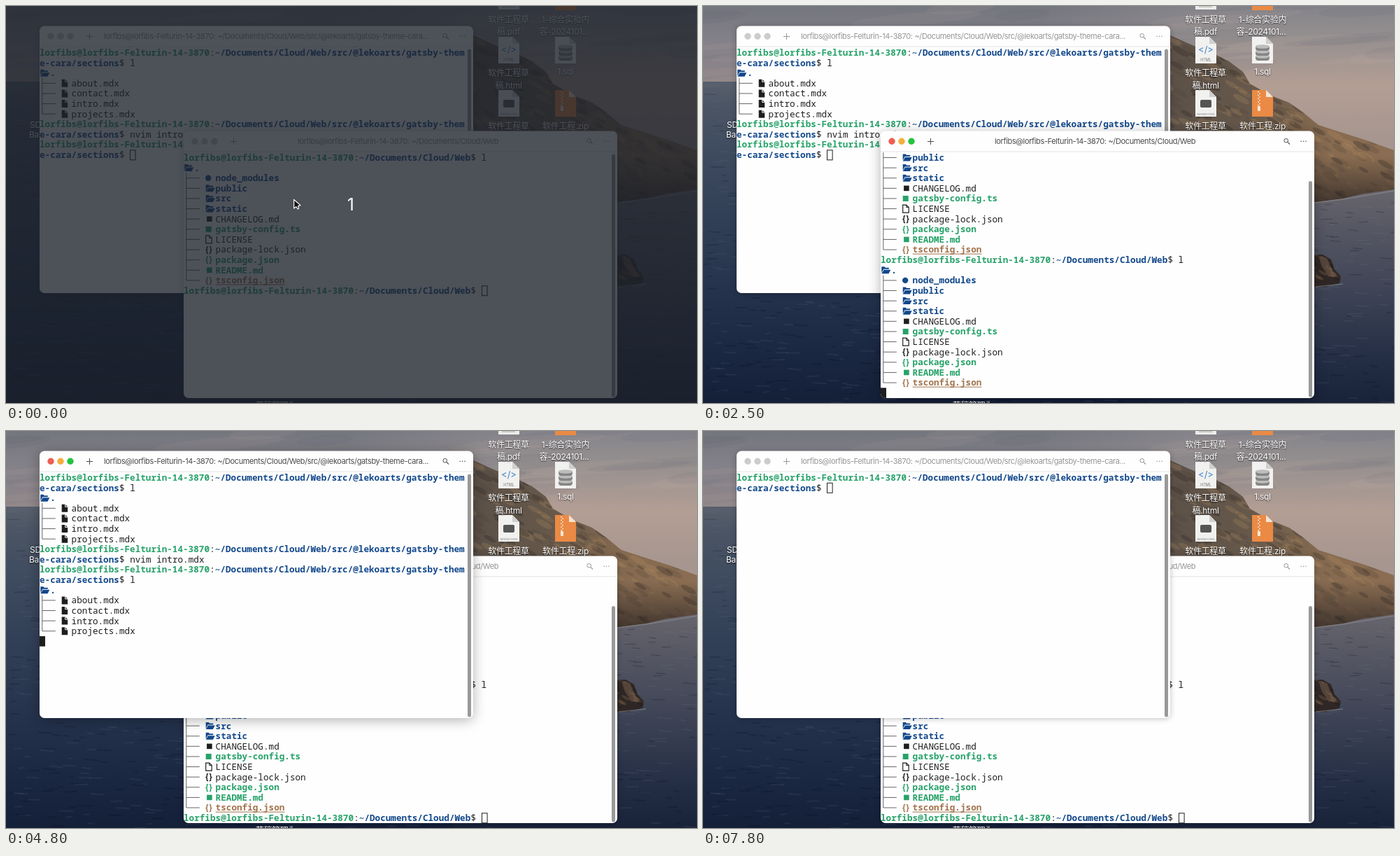
An HTML page with a canvas that plays this animation: 988x567 px, repeating every 7.9 s.

```html
<!DOCTYPE html>
<html lang="en">
<head>
<meta charset="utf-8">
<title>Two terminals</title>
<style>
html, body { margin: 0; width: 100%; height: 100%; overflow: hidden; background: #1b2a46; }
canvas { display: block; width: 100vw; height: 100vh; }
</style>
</head>
<body>
<canvas id="stage" width="988" height="567"></canvas>
<script>
const W = 988, H = 567, LOOP = 7900, STEP = 100;
const CELL = 7.6, LINE = 14.615;
const INK = '#1e1e1e', GREEN = '#26a269', BLUE = '#12488b', BROWN = '#a2734c';
const MONO = '12.667px "Noto Sans Mono", monospace';
const UI = 'Inter, "Noto Sans CJK SC", "Noto Sans CJK", sans-serif';
const HOST = 'lorfibs@lorfibs-Felturin-14-3870';
const TAIL = 'e-cara/sections$ ';

const stage = document.getElementById('stage');
let ctx = stage.getContext('2d');

const clamp = v => Math.max(0, Math.min(1, v));
const ramp = (t, a, b) => clamp((t - a) / (b - a));
const ease = p => p * p * (3 - 2 * p);
const lerp = (a, b, p) => a + (b - a) * p;

function poly(points, color) {
  ctx.beginPath();
  points.forEach(([x, y]) => ctx.lineTo(x, y));
  ctx.closePath();
  if (color) { ctx.fillStyle = color; ctx.fill(); }
}
function rect(x, y, w, h, color) {
  ctx.fillStyle = color;
  ctx.fillRect(x, y, w, h);
}
function round(x, y, w, h, r, color) {
  ctx.beginPath();
  ctx.roundRect(x, y, w, h, r);
  if (color) { ctx.fillStyle = color; ctx.fill(); }
}
function oval(x, y, rx, ry, tilt, color) {
  ctx.beginPath();
  ctx.ellipse(x, y, rx, ry, tilt, 0, 7);
  ctx.fillStyle = color;
  ctx.fill();
}
function disc(x, y, r, color) {
  oval(x, y, r, r, 0, color);
}
function line(color, width, ...points) {
  ctx.beginPath();
  points.forEach(([x, y], i) => i % 2 ? ctx.lineTo(x, y) : ctx.moveTo(x, y));
  ctx.strokeStyle = color;
  ctx.lineWidth = width;
  ctx.stroke();
}
function fade(x0, y0, x1, y1, ...stops) {
  const g = ctx.createLinearGradient(x0, y0, x1, y1);
  stops.forEach(([p, c]) => g.addColorStop(p, c));
  return g;
}
function seeded(seed) {
  return () => (seed = (seed * 16807) % 2147483647) / 2147483647;
}

// ---- Desktop ----
function rubble(rnd, count, x, y, w, h, size) {
  const tones = ['rgba(30,25,25,.24)', 'rgba(190,148,102,.2)', 'rgba(70,62,52,.2)'];
  for (let i = 0; i < count; i++) {
    const s = size * (.3 + rnd());
    oval(x + rnd() * w, y + rnd() * h, s * 1.8, s * .6, .5, tones[i % 3]);
  }
}
function drawSky(rnd) {
  rect(0, 0, W, 220, fade(0, 0, 0, 112, [0, '#74767e'], [.5, '#85828a'], [1, '#8e8588']));
  const glow = fade(0, 0, 0, 190, [0, '#85848b'], [.25, '#96908f'], [.6, '#b39e94'], [1, '#a6968f']);
  for (let i = 0; i < 30; i++) {
    ctx.globalAlpha = i / 29;
    rect(480 + i * 8, 0, i < 29 ? 8 : W, 220, glow);
  }
  ctx.globalAlpha = 1;
  for (let i = 0; i < 40; i++) {
    oval(rnd() * W, rnd() * 110, 40 + rnd() * 80, 3 + rnd() * 7, -.08,
      i % 2 ? 'rgba(205,180,165,.08)' : 'rgba(80,84,100,.08)');
  }
}
function drawSea(rnd) {
  rect(0, 108, 700, 459, fade(0, 108, 0, H,
    [0, '#59606d'], [.08, '#4a5464'], [.25, '#3c495e'], [.5, '#2d3b53'], [.75, '#1f2d47'], [1, '#141f38']));
  rect(640, 250, 348, 317, fade(0, 262, 0, H,
    [0, '#67656d'], [.2, '#555663'], [.5, '#3c4254'], [.8, '#232d44'], [1, '#182239']));
  for (let i = 0; i < 1100; i++) {
    const y = 112 + 455 * rnd(), x = rnd() * W, w = 6 + rnd() * 16;
    if (x > 640 && y < 280) continue;
    line(i % 2 ? 'rgba(150,160,180,.1)' : 'rgba(5,10,25,.2)', .8 + y / 500, [x, y], [x + w, y + rnd() * 3 - 1]);
  }
}
function drawLand() {
  const rnd = seeded(77);
  drawSky(rnd);
  drawSea(rnd);

  ctx.save();
  poly([[640, 32], [668, 42], [702, 57], [730, 68], [752, 79], [772, 94], [782, 111], [812, 128],
    [838, 138], [858, 152], [880, 170], [908, 179], [946, 191], [988, 206], [988, 262], [944, 268],
    [915, 275], [870, 281], [640, 281]],
    fade(668, 0, 988, 0, [0, '#5c5148'], [.35, '#66584a'], [.7, '#876b50'], [1, '#8a6d52']));
  ctx.clip();
  rubble(rnd, 420, 640, 40, 348, 240, 6);
  rect(640, 215, 348, 70, fade(0, 215, 0, 282, [0, 'rgba(40,34,34,0)'], [1, 'rgba(40,34,34,.75)']));
  ctx.restore();
  line('rgba(190,185,190,.3)', 1.5, [874, 281], [915, 276], [915, 276], [988, 264]);

  ctx.save();
  poly([[868, 356], [886, 355], [898, 362], [903, 376], [912, 386], [910, 396], [890, 401], [868, 401]], '#2f2725');
  ctx.clip();
  poly([[880, 357], [892, 360], [900, 378], [908, 388], [894, 386], [885, 372]], '#55443a');
  rubble(rnd, 40, 868, 355, 44, 45, 3);
  ctx.restore();
  line('rgba(180,185,200,.35)', 1.5, [876, 401], [915, 397]);
}

function file(x, y, color, fold) {
  poly([[x, y], [x + 20, y], [x + 30, y + 10], [x + 30, y + 38], [x, y + 38]], color);
  poly([[x + 20, y], [x + 30, y + 10], [x + 20, y + 10]], fold);
}
function caption(text, x, y, size) {
  ctx.font = `${size || 12}px ${UI}`;
  ctx.fillText(text, x, y + 4.3);
}
function drawIcons() {
  file(704, -33, '#ececea', '#ccc');
  line('#a5a5a5', 1, [709, 1], [728, 1]);
  file(785, -32, '#ea8a45', '#fff');
  file(704, 44, '#f1f1ef', '#cfcfcf');
  file(785, 44, '#f1f1ef', '#cfcfcf');
  file(704, 120, '#f1f1ef', '#cfcfcf');
  file(785, 120, '#ea8a45', '#f7e3d4');
  ctx.textAlign = 'center';
  ctx.fillStyle = '#3d82c9';
  caption('</>', 719, 63, 13);
  ctx.fillStyle = '#777';
  caption('HTML', 719, 75, 5.5);
  for (let i = 2; i >= 0; i--) {
    round(790, 56 + i * 7, 20, 8, 4, '#858585');
    oval(800, 58 + i * 7, 10, 2.8, 0, '#bdbdbd');
  }
  round(711, 134, 16, 11, 2, '#555');
  ctx.fillStyle = '#888';
  caption('MARKDOWN', 719, 152, 4);
  for (let i = 0; i < 9; i++) rect(793 + i % 2 * 2, 122 + i * 2.4, 2, 1.4, '#fbe6d8');
  round(793, 143, 4, 7, 1, '#fbe6d8');

  ctx.fillStyle = '#fff';
  ctx.shadowColor = 'rgba(0,0,0,.75)';
  ctx.shadowBlur = 2;
  ctx.shadowOffsetY = 1;
  ctx.letterSpacing = '-0.3px';
  for (const y of [20, 96, 172]) caption('软件工程草', 718.5, y);
  caption('稿.pdf', 718.5, 37);
  caption('稿.html', 718.5, 114);
  caption('1-综合实验内', 800, 20);
  caption('容-2024101...', 798, 37);
  caption('1.sql', 800, 94);
  caption('软件工程.zip', 800, 172);
  caption('草稿管理为', 386, 571);
  ctx.textAlign = 'left';
  caption('SD', 34, 170);
  caption('Base', 33, 184);
}

function makeDesktop() {
  const c = document.createElement('canvas');
  c.width = W; c.height = H;
  const main = ctx;
  ctx = c.getContext('2d');
  drawLand();
  drawIcons();
  ctx = main;
  return c;
}

// ---- Terminal contents ----
const seg = (text, color = INK, bold = false) => ({ text, color, bold });
const prompt = path => [seg(HOST, GREEN, true), seg(':'), seg(path, BLUE, true)];
const webPrompt = cmd => ({ segs: [...prompt('~/Documents/Cloud/Web'), seg('$ ' + cmd)] });
const longPrompt = cmd => [
  { segs: prompt('~/Documents/Cloud/Web/src/@lekoarts/gatsby-them') },
  { segs: [seg(TAIL.slice(0, 15), BLUE, true), seg('$ ' + cmd)] }
];
function tree(items) {
  const rows = items.map(([icon, name, color, bold], i) => ({
    icon, col: 4, color, at: 6, segs: [seg(name, color, bold)],
    branch: i < items.length - 1 ? 1 : 2
  }));
  return [{ icon: 'folder', col: 0, color: BLUE, at: 2, segs: [seg('.', BLUE, true)] }, ...rows];
}
const sections = tree(['about', 'contact', 'intro', 'projects'].map(n => ['doc', n + '.mdx', INK]));
const project = tree([
  ['disc', 'node_modules', BLUE, true],
  ['folder', 'public', BLUE, true],
  ['folder', 'src', BLUE, true],
  ['folder', 'static', BLUE, true],
  ['bar', 'CHANGELOG.md', INK],
  ['square', 'gatsby-config.ts', GREEN, true],
  ['page', 'LICENSE', INK],
  ['braces', 'package-lock.json', INK],
  ['braces', 'package.json', GREEN, true],
  ['bar', 'README.md', GREEN, true],
  ['braces', 'tsconfig.json', BROWN, true]
]);
project[project.length - 1].underline = true;

function webScreen(t) {
  const rows = [webPrompt('l'), ...project];
  if (t < 2500) return { rows: [...rows, webPrompt(t < 2200 ? '' : 'l')], col: t < 2200 ? 56 : 57 };
  rows.push(webPrompt('l'), ...project);
  if (t < 2600) return { rows: [...rows, { segs: [] }], col: 0 };
  return { rows: [...rows, webPrompt('')], col: 56 };
}
function sectionScreen(t) {
  if (t >= 5800) {
    return t < 5900 ? { rows: [{ segs: [] }], col: 0 } : { rows: longPrompt(''), col: 17 };
  }
  const rows = [...longPrompt('l'), ...sections, ...longPrompt('nvim intro.mdx')];
  if (t < 4800) {
    const cmd = t < 4600 ? '' : 'l';
    return { rows: [...rows, ...longPrompt(cmd)], col: 17 + cmd.length };
  }
  rows.push(...longPrompt('l'), ...sections);
  if (t < 4900) return { rows: [...rows, { segs: [] }], col: 0 };
  const typed = t < 5400 ? 0 : [1, 2, 4, 5][(t - 5400) / STEP];
  return { rows: [...rows, ...longPrompt('clear'.slice(0, typed))], col: 17 + typed };
}

function glyph(kind, x, y, color) {
  if (kind === 'folder') {
    poly([[x + 1, y + 4], [x + 1, y - 5], [x + 5, y - 5], [x + 6.5, y - 3.5], [x + 11.5, y - 3.5],
      [x + 11.5, y - 1.5], [x + 4, y - 1.5]], color);
    poly([[x + 4.4, y - .6], [x + 14, y - .6], [x + 11.2, y + 5], [x + 1, y + 5]], color);
  } else if (kind === 'doc' || kind === 'page') {
    poly([[x + 1, y - 5.5], [x + 6, y - 5.5], [x + 9.5, y - 2], [x + 9.5, y + 5.5], [x + 1, y + 5.5]],
      kind === 'doc' && color);
    ctx.strokeStyle = color;
    ctx.lineWidth = 1.2;
    if (kind === 'page') ctx.stroke();
    line(kind === 'doc' ? '#fff' : color, 1, [x + 6, y - 5.5], [x + 6, y - 2], [x + 6, y - 2], [x + 9.5, y - 2]);
  } else if (kind === 'disc') {
    disc(x + 4.5, y, 4.2, color);
  } else if (kind === 'bar') {
    rect(x + 2.4, y - 3.8, 7.6, 7.6, color);
  } else if (kind === 'square') {
    rect(x + 1, y - 4, 8, 8, color);
  } else {
    ctx.font = 'bold 11.5px "Noto Sans Mono", monospace';
    ctx.fillStyle = color;
    ctx.fillText('{', x - 1, y + 3.8);
    ctx.fillText('}', x + 4.6, y + 3.8);
  }
}
function drawRow(row, y) {
  if (row.branch) {
    line('#666', 1, [3.8, y - LINE / 2], [3.8, row.branch === 1 ? y + LINE / 2 : y], [3.8, y], [22.8, y]);
  }
  if (row.icon) glyph(row.icon, row.col * CELL + .3, y, row.color);
  let col = row.at || 0;
  for (const s of row.segs) {
    ctx.font = (s.bold ? 'bold ' : '') + MONO;
    ctx.fillStyle = s.color;
    ctx.fillText(s.text, col * CELL, y + 4.4);
    if (row.underline) rect(col * CELL, y + 5.6, s.text.length * CELL, 1, s.color);
    col += s.text.length;
  }
}

// ---- Windows ----
function mix(a, b, p) {
  return `rgb(${a.map((v, i) => Math.round(lerp(v, b[i], p)))})`;
}
function drawWindow(win) {
  const { x, y, title, titleX, focus, active, cursor, screen } = win;
  ctx.save();
  ctx.translate(x, y);
  ctx.save();
  ctx.shadowColor = `rgba(0,0,0,${.24 + .06 * focus})`;
  ctx.shadowBlur = 9 + 9 * focus;
  ctx.shadowOffsetY = 1 + 2 * focus;
  round(0, 0, 620, 381.5, 7, '#fefefe');
  ctx.restore();
  round(0, 0, 620, 381.5, 7);
  ctx.clip();

  const ink = mix([150, 150, 150], [75, 75, 75], focus);
  [[237, 95, 84], [245, 174, 61], [38, 195, 65]].forEach((c, i) =>
    disc(16 + 14 * i, 14.7, 4.7, mix([204, 204, 204], c, focus)));
  line(ink, 1, [67, 15], [76, 15], [71.5, 10.5], [71.5, 19.5]);
  ctx.beginPath();
  ctx.arc(579.7, 13.7, 2.8, 0, 7);
  ctx.stroke();
  line(ink, 1.1, [581.8, 15.8], [585, 19]);
  for (let i = 0; i < 3; i++) disc(601.2 + 3.4 * i, 14.7, .8, ink);
  ctx.letterSpacing = '-0.36px';
  ctx.font = '11px ' + UI;
  ctx.fillStyle = ink;
  ctx.fillText(title, titleX, 18.4);
  ctx.letterSpacing = '0px';
  rect(0, 29, 620, 1, '#e6e6e6');

  const { rows, col } = screen;
  const skip = Math.max(0, rows.length - 24);
  rows.slice(skip).forEach((r, i) => drawRow(r, 38 + LINE * i));
  const cy = 38 + LINE * (rows.length - 1 - skip) - 7.3;
  if (!active) {
    ctx.strokeStyle = INK;
    ctx.lineWidth = 1;
    ctx.strokeRect(Math.round(col * CELL) + .5, cy + .5, 7.6, 14);
  } else if (cursor) {
    rect(col * CELL, cy, 8, 14.6, INK);
  }
  const top = 33 + 347 * skip / rows.length;
  round(612, top, 5, 380 - top, 2.5, '#999');
  ctx.restore();
}

// ---- Pointer ----
function drawArrow(x, y) {
  ctx.save();
  ctx.translate(x, y);
  poly([[.7, .5], [.7, 13], [3.8, 10.6], [6.3, 14], [7.6, 13], [6.6, 9.6], [10, 8.6]], '#111');
  ctx.strokeStyle = '#fff';
  ctx.lineWidth = 1.2;
  ctx.lineJoin = 'round';
  ctx.stroke();
  ctx.restore();
}
function drawBeam(x, y) {
  const arms = [[x, y - 5], [x, y + 5], [x - 3, y - 5.5], [x + 3, y - 5.5], [x - 3, y + 5.5], [x + 3, y + 5.5]];
  line('#fff', 3, ...arms);
  line('#111', 1.4, ...arms);
}
function drawPointer(t) {
  if (t < 100) return drawArrow(411, 276);
  if (t < 700) {
    const p = ease(ramp(t, 200, 700));
    return drawBeam(lerp(411.5, 572, p), lerp(276, 362, p));
  }
  if (t < 1700) return t < 1200 ? drawArrow(571, 361) : drawArrow(572, 362);
  if (t < 2200 || (t >= 4000 && t < 4600)) return drawBeam(572, 362);
  if (t >= 6400 && t < 7100) {
    const p = ease(ramp(t, 6300, 6900));
    return drawArrow(lerp(572, 206, p), lerp(362, 41, p));
  }
  if (t >= 7100 && t < 7400) {
    const p = ramp(t, 7000, 7300);
    drawArrow(lerp(206, 72, p), lerp(41, 1, p));
  }
}

const desktop = makeDesktop();

function draw(t) {
  ctx.drawImage(desktop, 0, 0);
  const raised = t >= 3900;
  const swap = ramp(t, 3800, 4200);
  const title = HOST + ': ~/Documents/Cloud/Web';
  const web = {
    x: 254, y: 178.5, title, titleX: 163,
    focus: ramp(t, 1300, 1600) * (1 - swap),
    active: t >= 1400 && !raised,
    cursor: !(t >= 2000 && t < 2200) && !(t >= 3100 && t < 3800),
    screen: webScreen(t)
  };
  const section = {
    x: 48, y: 28.5, title: title + '/src/@lekoarts/gatsby-theme-cara...', titleX: 92,
    focus: swap * (1 - ramp(t, 7600, 7800)),
    active: raised && t < 7700,
    cursor: true,
    screen: sectionScreen(t)
  };
  (raised ? [web, section] : [section, web]).forEach(drawWindow);
  if (t < 100) {
    rect(0, 0, W, H, 'rgba(28,33,42,.78)');
    ctx.font = '24px ' + UI;
    ctx.textAlign = 'center';
    ctx.fillStyle = '#fff';
    ctx.fillText('1', 493, 292);
    ctx.textAlign = 'left';
  }
  drawPointer(t);
}

let shown = -1;
const start = performance.now();
function tick() {
  const t = Math.floor((performance.now() - start) % LOOP / STEP) * STEP;
  if (t !== shown) draw(shown = t);
  requestAnimationFrame(tick);
}
tick();
</script>
</body>
</html>
```
